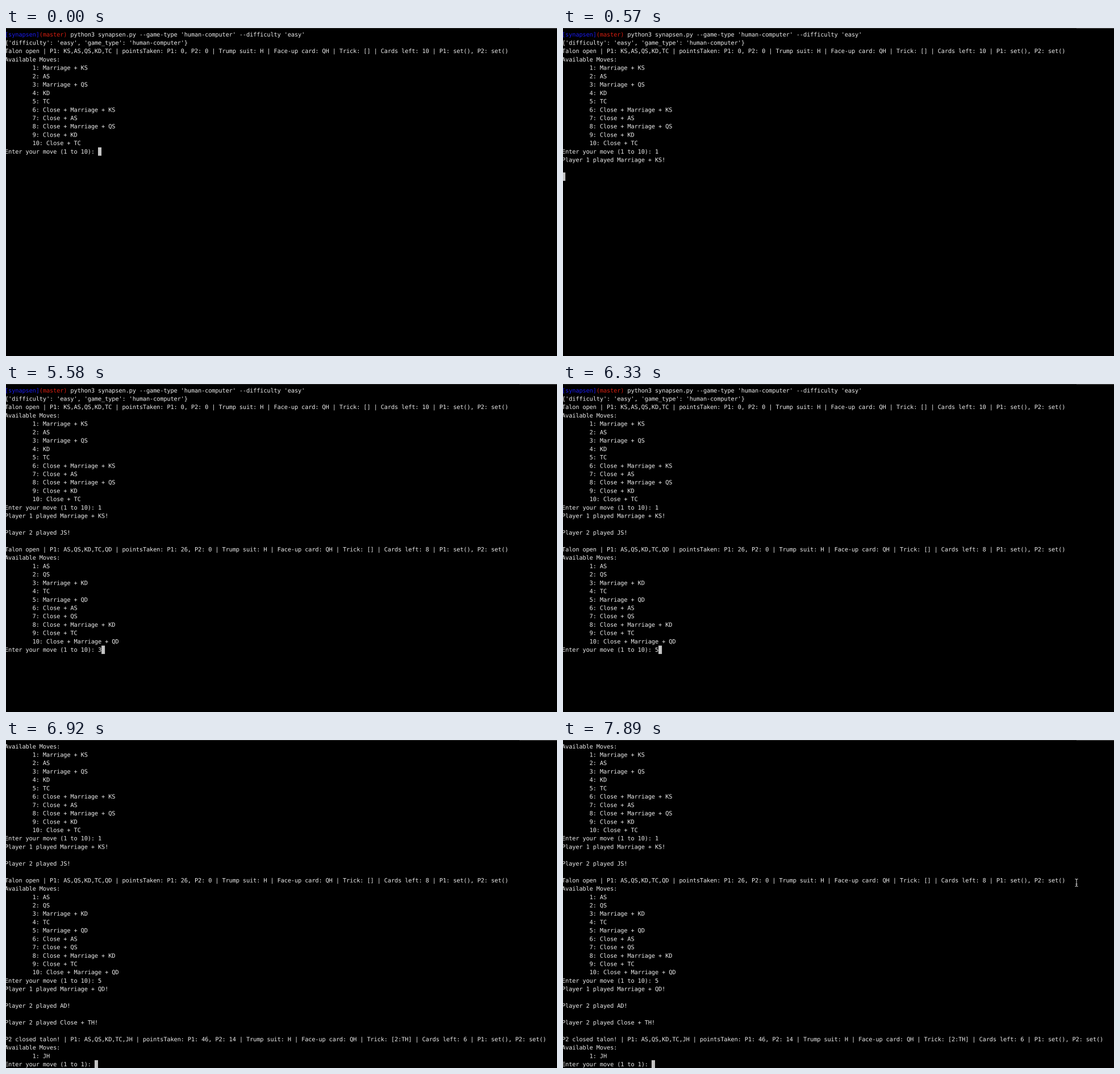
These frames come from a looping animation (970x577 px, 8000 ms). An HTML page with a canvas:

```html
<!DOCTYPE html>
<html lang="en">
<head>
<meta charset="utf-8">
<title>Card game in a terminal</title>
<style>
  html, body { margin: 0; width: 100%; height: 100%; overflow: hidden; background: #000; }
  canvas { display: block; }
</style>
</head>
<body>
<canvas id="stage" width="970" height="577"></canvas>
<script>
const W = 970, H = 577, SCALE = 2;
const stage = document.getElementById('stage').getContext('2d');

// Drawn at double size, then smoothed down, so rows may sit between pixels.
const large = document.createElement('canvas');
large.width = W * SCALE;
large.height = H * SCALE;
const ctx = large.getContext('2d');
ctx.scale(SCALE, SCALE);

const LOOP = 8000;
const LEFT = -1.9, TOP = 3.9;
const CELL_W = 6.07, CELL_H = 14.72;
const BASELINE = 10.9;
const ROWS = 39;
const FG = '#ececec', BLUE = '#1a1aee', RED = '#d81e10';

const status = (talon, hand, p1, p2, trick, left) =>
  `${talon} | P1: ${hand} | pointsTaken: P1: ${p1}, P2: ${p2} | Trump suit: H | ` +
  `Face-up card: QH | Trick: [${trick}] | Cards left: ${left} | P1: set(), P2: set()\n`;

const menu = moves => 'Available Moves:\n' +
  moves.map((m, i) => `${' '.repeat(8)}${i + 1}: ${m}\n`).join('') +
  `Enter your move (1 to ${moves.length}): `;

const withClose = moves => [...moves, ...moves.map(m => 'Close + ' + m)];
const played = (player, move) => `Player ${player} played ${move}!\n\n`;

// Terminal output by time; \b deletes the last character.
const output = [
  [0, "[synapsen](master) python3 synapsen.py --game-type 'human-computer' --difficulty 'easy'\n" +
      "{'difficulty': 'easy', 'game_type': 'human-computer'}\n" +
      status('Talon open', 'KS,AS,QS,KD,TC', 0, 0, '', 10) +
      menu(withClose(['Marriage + KS', 'AS', 'Marriage + QS', 'KD', 'TC']))],
  [500, '1'],
  [570, '\n' + played(1, 'Marriage + KS')],
  [790, played(2, 'JS') +
      status('Talon open', 'AS,QS,KD,TC,QD', 26, 0, '', 8) +
      menu(withClose(['AS', 'QS', 'Marriage + KD', 'TC', 'Marriage + QD']))],
  [5580, '3'],
  [6030, '\b'],
  [6330, '5'],
  [6400, '\n' + played(1, 'Marriage + QD')],
  [6700, played(2, 'AD')],
  [6920, played(2, 'Close + TH') +
      status('P2 closed talon!', 'AS,QS,KD,TC,JH', 46, 14, '2:TH', 6) +
      menu(['JH'])]
];

function screenAt(t) {
  let text = '';
  for (const [at, chunk] of output) {
    if (at > t) break;
    text = chunk === '\b' ? text.slice(0, -1) : text + chunk;
  }
  return text.split('\n');
}

function colorAt(line, col) {
  if (line > 0 || col > 17) return FG;
  return col < 10 ? BLUE : RED;
}

function drawPointer(x, y) {
  ctx.strokeStyle = '#e0e0e0';
  ctx.lineWidth = 1;
  ctx.beginPath();
  for (const side of [-2.5, 2.5]) {
    ctx.moveTo(x + side, y - 6.5);
    ctx.quadraticCurveTo(x, y - 6.5, x, y - 4.5);
    ctx.moveTo(x + side, y + 6.5);
    ctx.quadraticCurveTo(x, y + 6.5, x, y + 4.5);
  }
  ctx.moveTo(x, y - 4.5);
  ctx.lineTo(x, y + 4.5);
  ctx.moveTo(x - 1.5, y + 2.5);
  ctx.lineTo(x + 1.5, y + 2.5);
  ctx.stroke();
}

function draw(t) {
  ctx.fillStyle = '#000';
  ctx.fillRect(0, 0, W, H);
  ctx.fillStyle = '#2a2a2a';
  ctx.fillRect(0, 0, 904, 1);
  ctx.fillStyle = '#505050';
  ctx.fillRect(904, 0, W - 904, 1);

  ctx.font = '10.3px "DejaVu Sans Mono", monospace';
  ctx.textRendering = 'geometricPrecision';
  const lines = screenAt(t);
  const scroll = Math.max(0, lines.length - ROWS);
  lines.slice(scroll).forEach((line, row) => {
    const y = TOP + row * CELL_H + BASELINE;
    for (let col = 0; col < line.length; col++) {
      if (line[col] === ' ') continue;
      ctx.fillStyle = colorAt(row + scroll, col);
      ctx.fillText(line[col], LEFT + col * CELL_W, y);
    }
  });

  const last = lines.length - 1;
  ctx.fillStyle = '#c4c4c4';
  ctx.fillRect(LEFT + lines[last].length * CELL_W, TOP + (last - scroll) * CELL_H, CELL_W, CELL_H);

  if (t >= 7890) drawPointer(904, 251);
  else if (t >= 7820) drawPointer(921.5, 241.5);

  stage.imageSmoothingQuality = 'high';
  stage.drawImage(large, 0, 0, W, H);
}

const start = performance.now();
function tick() {
  draw((performance.now() - start) % LOOP);
  requestAnimationFrame(tick);
}
tick();
</script>
</body>
</html>
```
